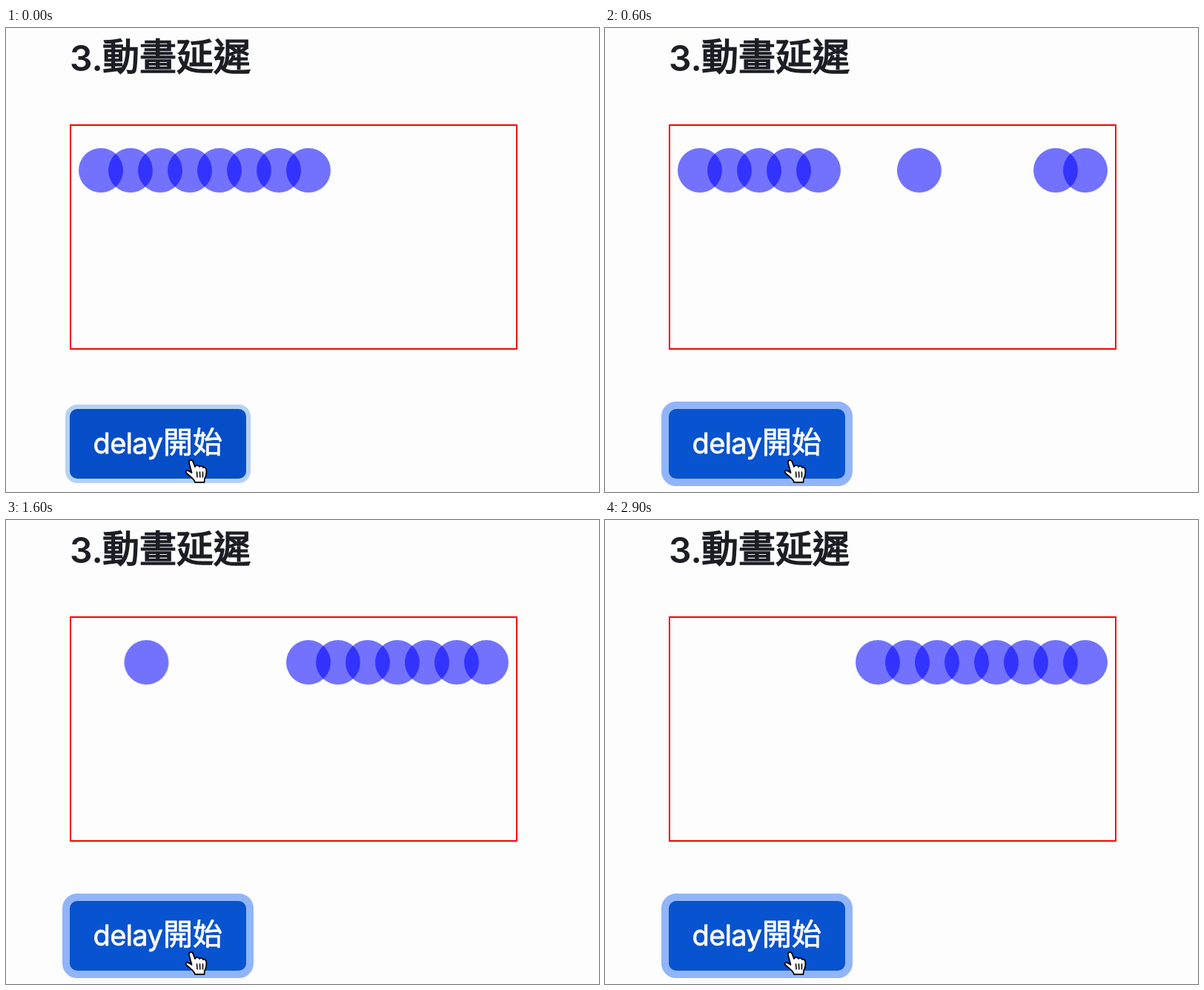
An HTML page that plays this animation: 800x626 px, repeating every 3 s.

```html
<!DOCTYPE html>
<html lang="zh-Hant">
<head>
<meta charset="utf-8">
<title>動畫延遲</title>
<style>
  html, body { margin: 0; width: 100%; height: 100%; overflow: hidden; background: #fdfdfd; }
  svg { display: block; width: 800px; height: 626px; }
  text { font-family: "Noto Sans CJK TC", "Noto Sans CJK", sans-serif; }
  .latin { font-family: Inter, sans-serif; }
  .title { font-size: 50px; fill: #1d1e25; stroke: #1d1e25; stroke-width: 1.7px; }
  .title.latin { font-size: 48px; font-weight: 600; stroke: none; }
  .label { font-size: 40px; fill: #fdfdfd; stroke: #fdfdfd; stroke-width: .8px; }
  .label.latin { font-size: 38px; letter-spacing: -.6px; }
  #button { paint-order: stroke; }
  #balls { fill: #00f; fill-opacity: .55; }
</style>
</head>
<body>
<svg viewBox="0 0 800 626">
  <text class="title latin" x="86" y="58">3.</text>
  <text class="title" x="130" y="57">動畫延遲</text>

  <rect x="87" y="131" width="602" height="302" fill="none" stroke="#f80000" stroke-width="2"/>
  <g id="balls"></g>

  <rect id="button" x="86" y="514" width="238" height="94" rx="10"/>
  <text class="label latin" x="117.5" y="574">delay</text>
  <text class="label" x="212" y="573">開始</text>

  <g stroke="#000" stroke-width="1.8" stroke-linejoin="round" stroke-linecap="round">
    <path fill="#fdfdfd" d="M247 587C246 582.500 251 581.500 252.500 585.500L255 592
      C256 589.500 260 589.500 261 592C262 590 265.500 590.500 266 593
      C268 592 270 593.500 270.200 596C270.800 601 270.500 604 268 608
      L267.500 613H255C254 609 250 606 247 603.500
      C243.500 601 241.500 599 243 597.500C245 596 248 598 250.500 600Z"/>
    <path fill="none" stroke-width="1.500" d="M257.500 599l.5 7M261.500 599l.3 7M265.500 599v7"/>
  </g>
</svg>
<script>
  const LOOP = 3000, TICK = 100, STEPS = LOOP / TICK;
  const COUNT = 8, GAP = 40, TRAVEL = 240;
  const FIRST = 84, DELAY = 200, DURATION = 250, LAST_LAG = 16;

  const cubicInOut = p => p < .5 ? 4 * p ** 3 : 1 - 4 * (1 - p) ** 3;
  const clamp = p => Math.min(1, Math.max(0, p));

  // Hold each pose for one tick, then jump to the next.
  function play(el, poseAt) {
    const frames = Array.from({ length: STEPS + 1 }, (_, k) => ({
      ...poseAt(Math.min(k, STEPS - 1) * TICK),
      offset: k / STEPS,
      easing: 'steps(1, end)'
    }));
    return el.animate(frames, { duration: LOOP, iterations: Infinity });
  }

  const balls = document.getElementById('balls');
  const moves = [];
  for (let i = 0; i < COUNT; i++) {
    const ball = document.createElementNS('http://www.w3.org/2000/svg', 'circle');
    ball.setAttribute('cx', 128 + GAP * i);
    ball.setAttribute('cy', 192);
    ball.setAttribute('r', 30);
    balls.append(ball);
    const start = FIRST + DELAY * (COUNT - 1 - i) + (i ? 0 : LAST_LAG);
    moves.push(play(ball, t => {
      const x = TRAVEL * cubicInOut(clamp((t - start) / DURATION));
      return { transform: `translateX(${x.toFixed(2)}px)` };
    }));
  }

  const pressed = { fill: '#054ec8', stroke: '#b6d2f3', strokeWidth: '12px' };
  const focused = { fill: '#0853cf', stroke: '#91b5f8', strokeWidth: '20px' };
  moves.push(play(document.getElementById('button'), t => t < TICK ? pressed : focused));

  for (const move of moves) move.startTime = document.timeline.currentTime;
</script>
</body>
</html>
```
